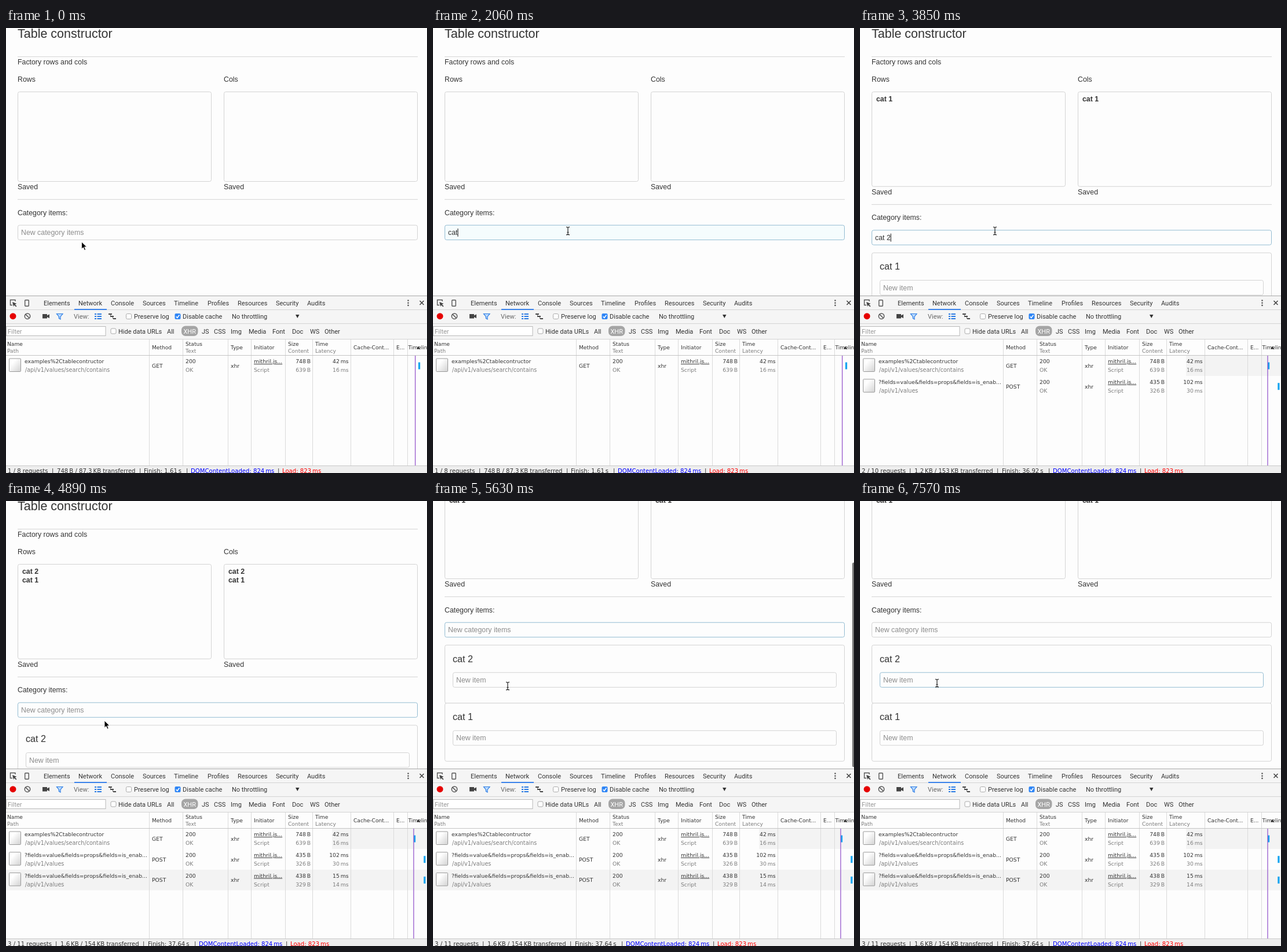
Animation, 727 px wide and 770 px high, one loop 8000 ms. Source, as an HTML page:

```html
<!DOCTYPE html>
<html lang="en">
<head>
<meta charset="utf-8">
<title>Table constructor</title>
<style>
  html, body { margin: 0; width: 100%; height: 100%; overflow: hidden; background: #fdfdfd; }
  svg { display: block; width: 727px; height: 770px; }
  text { white-space: pre; fill: #333; }
  .page { font: 12.35px "Liberation Sans", Arial, sans-serif; }
  .title { font-size: 21.5px; }
  .heading { font-size: 16.2px; }
  .bold { font-weight: bold; }
  .hint { fill: #8c8c8c; }
  .tools { font: 11px Roboto, sans-serif; }
  .grid { font: 9.25px "DejaVu Sans", sans-serif; }
  .grid .path { font-size: 9.6px; }
  .grid .head { font-size: 9.1px; }
  .grid .dim { fill: #7c7c7c; }
  .status { font: 10.1px "DejaVu Sans", sans-serif; }
  .end { text-anchor: end; }
  .box { fill: #fdfdfd; stroke: #d3d3d3; }
</style>
</head>
<body>
<svg id="stage" viewBox="0 0 727 770"></svg>
<script>
const LOOP = 8000;
const stage = document.getElementById('stage');

const text = (x, y, str, cls = '', extra = '') =>
  `<text x="${x}" y="${y}" class="${cls}" ${extra}>${str.replace(/&/g, '&amp;')}</text>`;
const rect = (x, y, w, h, extra = '') =>
  `<rect x="${x}" y="${y}" width="${w}" height="${h}" ${extra}/>`;
const path = (d, extra = '') => `<path d="${d}" ${extra}/>`;
const hline = (y, x1 = 0, x2 = 727, color = '#d3d3d3') =>
  path(`M${x1} ${y}H${x2}`, `stroke="${color}"`);
const group = (id, body, extra = '') => `<g id="${id}" ${extra}>${body}</g>`;
// Units follow their number after a thin space.
const thin = str => str.replace(/(\d) (ms|s|KB|B)\b/g, '$1\u2009$2');

// Page: y positions are those of the empty, unscrolled form.
const listBox = (x, name) =>
  text(x, 93, name) +
  rect(x + .5, 110.5, 334, 155, 'rx="3" class="box listbox"') +
  text(x + 8, 126.7, '', 'bold list0') + text(x + 8, 142.4, '', 'bold list1');

const panel = i => {
  const y = 380.3 + i * 100.5;
  return group('panel' + i,
    rect(20.5, y, 690, 100.5, 'rx="3" class="box"') +
    text(34, y + 29.2, '', 'heading', `id="heading${i}"`) +
    rect(34.5, y + 47.5, 662, 25.5, `rx="3" class="box" id="item${i}"`) +
    text(40, y + 64.6, 'New item', 'hint'));
};

const page = group('page',
  text(20, 17.4, 'Table constructor', 'title') +
  hline(49.7, 20, 711) +
  text(20, 62.5, 'Factory rows and cols') +
  listBox(20, 'Rows') + listBox(376, 'Cols') +
  group('lower',
    text(20, 279.4, 'Saved') + text(376, 279.4, 'Saved') +
    hline(296.7, 20, 711) +
    text(20, 323.6, 'Category items:') +
    rect(20.5, 341.2, 690, 25.4, 'rx="3" class="box" id="field"') +
    text(26, 358.2, '', '', 'id="entry"') +
    panel(0) + panel(1) +
    path('M0 0v14', 'id="caret" stroke="#111"')),
  'class="page"');

// Developer tools
const TABS = [[65, 'Elements'], [125, 'Network'], [181, 'Console'], [236, 'Sources'], [290, 'Timeline'],
  [348, 'Profiles'], [400, 'Resources'], [466, 'Security'], [520, 'Audits']];
const FILTERS = [[278, 'All'], [338, 'JS'], [359, 'CSS'], [388, 'Img'], [419, 'Media'], [460, 'Font'],
  [494, 'Doc'], [525, 'WS'], [550, 'Other']];
const COLUMNS = [247.5, 305.5, 383.5, 423.5, 482.5, 529.5, 595.5, 669.5, 693.5];
const labels = (list, y) => list.map(([x, s]) => text(x, y, s)).join('');

const checkbox = (x, y, on) => on
  ? rect(x, y, 10, 10, 'rx="2" fill="#2f86f6"') +
    path(`M${x + 2.3} ${y + 5.2}l2 2.3 3.6-5`, 'fill="none" stroke="#fff" stroke-width="1.5"')
  : rect(x + .5, y + .5, 9, 9, 'rx="2" fill="#fff" stroke="#aaa"');

const icons =
  path('M16 473v-2.5H7.5v9H11', 'fill="none" stroke="#555" stroke-width="1.4"') +
  path('M11 474l7.5 3-3 1.2 3 3-1.3 1.3-3-3-1.2 2.8z', 'fill="#444"') +
  rect(32.7, 470.7, 6.6, 10.6, 'rx="1" fill="none" stroke="#555" stroke-width="1.4"') +
  [471.5, 475.7, 479.9].map(y => `<circle cx="694.5" cy="${y}" r="1.3" fill="#555"/>`).join('') +
  path('M714.5 472l7 7m0-7l-7 7', 'stroke="#444" stroke-width="1.6"') +
  '<circle cx="12" cy="498.7" r="5.5" fill="#e60000"/>' +
  '<circle cx="37" cy="498.7" r="4.7" fill="none" stroke="#555" stroke-width="1.5"/>' +
  path('M33.7 495.4l6.6 6.6', 'stroke="#555" stroke-width="1.5"') +
  path('M63 495h8v2.6l4-2.3v7l-4-2.3v2.6h-8z', 'fill="#444"') +
  path('M87.5 494.5h10.5l-4 5v4.5l-2.6-1.5v-3z', 'fill="#bcdcff" stroke="#2a7be4" stroke-width="1.2"') +
  [495, 499, 503].map(y =>
    path(`M153 ${y}h3m1.5 0h7.5`, 'stroke="#2a7be4" stroke-width="2"')).join('') +
  path('M177 495h6m-3 4h6m-1 4h5', 'stroke="#444" stroke-width="2"') +
  path('M180.5 496v3m4 0v4', 'stroke="#444" stroke-width=".8"') +
  path('M500 496h6.5l-3.2 6z', 'fill="#333"');

const HEADS = [[2, 'Name', 'Path'], [252, 'Method'], [310, 'Status', 'Text'], [388, 'Type'],
  [428, 'Initiator'], [487, 'Size', 'Content'], [534, 'Time', 'Latency'], [600, 'Cache-Cont...'],
  [674, 'E...'], [694.5, 'Timelin']];
const heads = HEADS.map(([x, top, sub]) => sub
  ? text(x, 550.2, top, 'head') + text(x, 562.2, sub, 'head dim')
  : text(x, 556, top, 'head')).join('');

const REQUESTS = [
  ['examples%2Ctablecontructor', '/api/v1/values/search/contains', 'GET', '748 B', '639 B', '42 ms', '16 ms'],
  ['?fields=value&fields=props&fields=is_enab...', '/api/v1/values', 'POST', '435 B', '326 B', '102 ms', '30 ms'],
  ['?fields=value&fields=props&fields=is_enab...', '/api/v1/values', 'POST', '438 B', '329 B', '15 ms', '14 ms']];

const request = ([name, url, method, size, content, time, latency], i) => {
  const y = 566.5 + i * 35.7, top = y + 13.7, sub = y + 28.7, mid = y + 21.3;
  const right = (x, line, str, cls = '') => text(x, line, thin(str), 'end ' + cls);
  return group('request' + i,
    (i == 2 ? rect(0, y, 727, 35.7, 'fill="#f3f3f3"') : '') +
    (i == 0 ? rect(563, y, 164, 35.7, 'fill="#f3f3f3" id="stripe"') : '') +
    rect(5.5, y + 5.5, 20, 22.5, 'rx="1" fill="url(#paper)" stroke="#999"') +
    text(32, top, name) + text(33, sub, url, 'path dim') +
    text(252, mid, method) +
    text(310, top, '200') + text(310, sub, 'OK', 'dim') +
    text(388, mid, 'xhr') +
    text(428, top, 'mithril.js...', '', 'text-decoration="underline"') + text(428, sub, 'Script', 'dim') +
    right(526, top, size) + right(526, sub, content, 'dim') +
    right(591.5, top, time) + right(591.5, sub, latency, 'dim') +
    rect(i ? 721.3 : 712, y + 12, 3.2, 12, `fill="#14a4f0" id="bar${i}"`));
};

const SUMMARY = [
  ['1 / 8 requests', '748 B / 87.3 KB transferred', 'Finish: 1.61 s'],
  ['2 / 10 requests', '1.2 KB / 153 KB transferred', 'Finish: 36.92 s'],
  ['3 / 11 requests', '1.6 KB / 154 KB transferred', 'Finish: 37.64 s']];
const summary = (parts, i) => {
  const [bars, cells] = i
    ? [[85, 236, 325, 483], [3, 94, 245, 333, 491]]
    : [[79, 230, 311, 469], [3, 88, 238, 319, 477]];
  const colors = ['#333', '#333', '#333', '#00f', '#f00'];
  return group('summary' + i,
    [...parts, 'DOMContentLoaded: 824 ms', 'Load: 823 ms']
      .map((s, k) => text(cells[k], 769.5, thin(s), '', `style="fill:${colors[k]}"`)).join('') +
    bars.map(x => text(x, 769.5, '|')).join(''), 'class="status"');
};

const tools =
  rect(0, 463, 727, 307, 'fill="#fdfdfd"') +
  rect(0, 463, 727, 76, 'fill="#f5f5f5"') +
  hline(463.5, 0, 727, '#a8a8a8') + hline(487.5) + hline(511.5) + hline(538.5) +
  rect(118, 486, 56, 2, 'fill="#3b82ea"') + icons +
  rect(.5, 516.5, 171.5, 16, 'fill="#fff" stroke="#b8b8b8"') +
  rect(303, 515.5, 28.5, 17.5, 'rx="7" fill="#a5a5a5"') +
  checkbox(207, 494) + checkbox(291.5, 494, true) + checkbox(180.5, 519.5) +
  group('labels',
    labels(TABS, 479.7) +
    labels([[221, 'Preserve log'], [305, 'Disable cache'], [390, 'No throttling']], 502.7) +
    text(117, 502.7, 'View:', '', 'style="fill:#666"') +
    text(3, 528.7, 'Filter', '', 'style="fill:#999"') +
    text(194, 528.5, 'Hide data URLs') + labels(FILTERS, 528.5) +
    text(317.2, 528.5, 'XHR', '', 'text-anchor="middle" style="fill:#fff"'), 'class="tools"') +
  group('rows', REQUESTS.map(request).join('') + heads, 'class="grid"') +
  COLUMNS.map(x => path(`M${x} 539V758`, 'stroke="#dadada"')).join('') +
  hline(566.5, 0, 727, '#c4c4c4') +
  path('M709 555.5h6l-3-5z', 'fill="#333"') +
  path('M0 567V758', 'id="marker" stroke="#9558cc" stroke-width="1.3"') +
  rect(0, 758, 727, 12, 'fill="#eee"') + hline(757.5, 0, 727, '#c8c8c8') +
  SUMMARY.map(summary).join('');

stage.innerHTML =
  `<defs><linearGradient id="paper" x2="1" y2="1">
    <stop offset=".3" stop-color="#fff"/><stop offset="1" stop-color="#d2d2d2"/>
  </linearGradient></defs>` +
  rect(0, 0, 727, 770, 'fill="#fdfdfd"') + page +
  rect(724, 0, 5, 354, 'rx="2.5" fill="#777" id="scrollbar"') +
  tools +
  path('M0 0v12.4l2.9-2.7 2.1 4.8 2.1-.9-2.1-4.7h4z', 'id="arrow" stroke="#fff" stroke-width=".9"') +
  path('M-3-6.7q2.5 0 3 1.2q.5-1.2 3-1.2M0-5.7v11.6M-3 6.9q2.5 0 3-1.2q.5 1.2 3 1.2M-1.5 2.5h3',
    'id="beam" fill="none" stroke="#222" stroke-width="1.2"');

// Steps: [start time, value]
const STEPS = {
  pointer: [[0, ['arrow', 130.5, 370]], [140, ['arrow', 143, 369]], [290, ['beam', 180, 359]],
    [440, ['beam', 216, 353]], [590, ['beam', 233, 351]], [4590, ['arrow', 222, 378]],
    [4740, ['arrow', 190, 380]], [4890, ['arrow', 170, 380]], [5030, ['arrow', 152, 342]],
    [5180, ['arrow', 128, 282]], [5330, ['arrow', 120.5, 266.5]], [5480, ['arrow', 123, 283]],
    [5630, ['beam', 129, 320]], [5780, ['beam', 133, 315]]],
  typed: [[0, ''], [1760, 'c'], [1910, 'ca'], [2060, 'cat'], [2510, 'cat '], [2660, 'cat 1'], [2810, ''],
    [3110, 'c'], [3260, 'ca'], [3410, 'cat'], [3850, 'cat 2'], [4150, '']],
  cats: [[0, []], [2810, ['cat 1']], [4150, ['cat 2', 'cat 1']]],
  requests: [[0, 1], [2960, 2], [4290, 3]],
  scroll: [[0, 0], [4890, 1], [5030, 38], [5180, 112], [5330, 143.3], [5480, 141.5], [5630, 139.7]],
  scrollbar: [[0, 0], [5030, 1], [6370, .5], [6520, 0]],
  border: [[0, '#d3d3d3'], [730, '#b8cbd6'], [880, '#93bcd2'], [5930, '#b8cbd6'], [6070, '#d3d3d3']],
  tint: [[0, '#fdfdfd'], [730, '#f5fcfd'], [2810, '#fdfdfd']],
  itemBorder: [[0, '#d3d3d3'], [5930, '#b8cbd6'], [6070, '#93bcd2']],
  caret: [[0, ''], [880, 'field'], [1320, ''], [1760, 'field'], [4590, ''], [5180, 'field'], [5480, ''],
    [5930, 'item'], [6520, ''], [7120, 'item'], [7570, '']]
};

const at = (name, t) => STEPS[name].filter(([start]) => start <= t).pop()[1];
const el = id => document.getElementById(id);
const set = (id, attrs) => Object.entries(attrs).forEach(([k, v]) => el(id).setAttribute(k, v));
const show = (id, on) => set(id, { visibility: on ? 'visible' : 'hidden' });
const each = (cls, fn) => document.querySelectorAll('.' + cls).forEach(fn);

function render(t) {
  const cats = at('cats', t), typed = at('typed', t), count = at('requests', t);
  const scroll = at('scroll', t), caret = at('caret', t);
  const [shape, px, py] = at('pointer', t);

  set('page', { transform: `translate(0 ${-scroll})` });
  set('lower', { transform: `translate(0 ${cats.length ? 8.7 : 0})` });
  each('listbox', box => box.setAttribute('height', cats.length ? 163.7 : 155));
  [0, 1].forEach(i => {
    each('list' + i, item => item.textContent = cats[i] || '');
    el('heading' + i).textContent = cats[i] || '';
    show('panel' + i, i < cats.length);
  });

  const entry = el('entry');
  entry.textContent = typed || 'New category items';
  set('entry', { class: typed ? '' : 'hint' });
  el('field').style.stroke = at('border', t);
  el('field').style.fill = at('tint', t);
  el('item0').style.stroke = at('itemBorder', t);

  const typedWidth = typed ? entry.getComputedTextLength() : 0;
  show('caret', caret);
  set('caret', { transform: caret == 'item'
    ? 'translate(40.5 434)' : `translate(${26.5 + typedWidth} 347)` });

  set('scrollbar', { y: scroll * .763, opacity: at('scrollbar', t) });
  [0, 1, 2].forEach(i => {
    show('request' + i, i < count);
    show('summary' + i, i == count - 1);
  });
  show('stripe', count > 1);
  set('bar0', { x: count > 1 ? 704 : 712 });
  set('marker', { transform: `translate(${count > 1 ? 704 : 706.7} 0)` });

  show('arrow', shape == 'arrow');
  show('beam', shape == 'beam');
  set(shape, { transform: `translate(${px} ${py})` });
}

function tick() {
  render(performance.now() % LOOP);
  requestAnimationFrame(tick);
}
tick();
</script>
</body>
</html>
```
